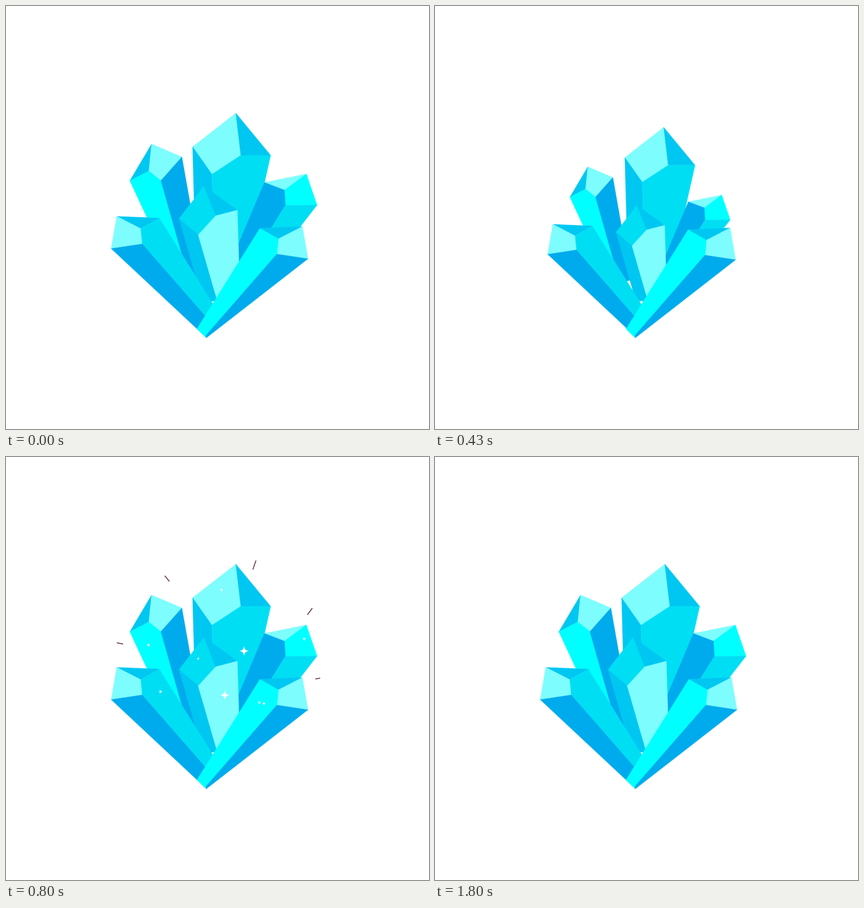
Animation of 748 by 748 pixels, one loop 2430 ms. Source, as an HTML page with a canvas:

```html
<!DOCTYPE html>
<html lang="en">
<head>
<meta charset="utf-8">
<title>Crystals</title>
<style>
  html, body { margin: 0; width: 100%; height: 100%; overflow: hidden; background: #fff; }
  canvas { display: block; width: 748px; height: 748px; }
</style>
</head>
<body>
<canvas id="stage" width="748" height="748"></canvas>
<script>
const ctx = document.getElementById('stage').getContext('2d');
const LOOP = 2430, LAST_STEP = 45;

const LIGHT = '#7dfdfe', CYAN = '#00ffff', TEAL = '#00def4', MID = '#00c7f1', BLUE = '#00abed';

// Two crystal shapes in units of their shoulder width, shoulders at (0, 0) and (1, 0).
// Vertices: 0 and 2 shoulders, 1 apex, 3 and 4 inner corners, 5 to 7 base.
const BROAD = {
  points: [[0, 0], [0.501, -0.486], [1, 0], [0.622, 0.041], [0.282, 0.32], [0.197, 1.446], [0.444, 1.482], [0.825, 1.538]],
  facets: [[1, 0, 4, 3], [1, 2, 3], [0, 4, 6, 5], [4, 3, 2, 7, 6]]
};
const SLIM = {
  points: [[0, 0], [0.613, -0.426], [1, 0], [0.373, -0.016], [0.495, 0.223], [0.015, 2.085], [0.209, 2.09], [0.45, 2.13]],
  facets: [[1, 0, 3], [1, 2, 4, 3], [0, 3, 4, 6, 7, 5], [4, 2, 7, 6]]
};
// The same slim crystal, running to a sharper foot
const SHARP = { ...SLIM, points: [...SLIM.points.slice(0, 7), [0.237, 2.132]] };

// Back to front. A right-to-left pair of shoulders mirrors the shape.
const crystals = [
  { shape: BROAD, from: [330, 249], to: [468, 264], pivot: [387, 438], depth: 0.202, colors: [LIGHT, MID, MID, TEAL] },
  { shape: SLIM, from: [219, 309], to: [311, 267], pivot: [331, 475], depth: 0.2, colors: [MID, LIGHT, CYAN, BLUE] },
  { shape: SLIM, from: [457, 312], to: [550, 352], pivot: [413, 479], depth: 0.205, colors: [LIGHT, CYAN, BLUE, TEAL] },
  { shape: BROAD, from: [306, 376], to: [409, 361], pivot: [391, 521], depth: 0.21, colors: [TEAL, MID, MID, LIGHT] },
  { shape: SLIM, from: [271, 375], to: [186, 429], pivot: [369, 568], depth: 0.183, colors: [MID, LIGHT, TEAL, BLUE] },
  { shape: SHARP, from: [449, 393], to: [534, 447], pivot: [353, 581], depth: 0.2, colors: [MID, LIGHT, CYAN, BLUE] }
];

// x, y, radius, rotation in degrees
const sparkles = [
  [421, 343, 18, 0], [387, 421, 18, 0], [381, 235, 8, 0], [252, 332.5, 8, 0], [527.3, 321.5, 8, 0],
  [340, 356.5, 6, 12], [273.3, 415, 8, 28], [448, 434, 8, 28], [456, 436, 8, 0]
];

// Inner end, outer end
const rays = [
  [436.5, 199, 450, 160], [289, 220, 269, 196], [207, 330.8, 180.5, 325.5],
  [533, 279, 554, 250.5], [547, 392.5, 567.5, 388.6]
];

const ease = (t, from, to) => {
  const u = Math.min(1, Math.max(0, (t - from) / (to - from)));
  return (1 - Math.cos(Math.PI * u)) / 2;
};

// Each crystal shrinks and regrows, the front one first.
function dipScale(t, turn, depth) {
  const start = 64 * turn;
  return 1 - depth * (ease(t, start, start + 240) - ease(t, start + 240, start + 480));
}

function drawCrystal({ shape, from, to, pivot, depth, colors }, turn, t) {
  const s = dipScale(t, turn, depth);
  const ux = to[0] - from[0], uy = to[1] - from[1], flip = Math.sign(ux);
  const placed = shape.points.map(([x, y]) => {
    const px = from[0] + x * ux - y * uy * flip;
    const py = from[1] + x * uy + y * ux * flip;
    return [pivot[0] + (px - pivot[0]) * s, pivot[1] + (py - pivot[1]) * s];
  });
  shape.facets.forEach((facet, i) => {
    ctx.beginPath();
    facet.forEach(v => ctx.lineTo(...placed[v]));
    ctx.closePath();
    ctx.fillStyle = ctx.strokeStyle = colors[i];
    ctx.lineWidth = 0.5;
    ctx.fill();
    ctx.stroke();
  });
}

function drawSparkle([x, y, radius, angle], scale) {
  const r = radius * scale, c = r * 0.08;
  ctx.save();
  ctx.translate(x, y);
  ctx.rotate(angle * Math.PI / 180);
  ctx.beginPath();
  ctx.moveTo(0, -r);
  for (let i = 0; i < 4; i++) {
    ctx.quadraticCurveTo(c, -c, r, 0);
    ctx.rotate(Math.PI / 2);
  }
  ctx.fillStyle = '#fff';
  ctx.fill();
  ctx.restore();
}

function drawRay([x0, y0, x1, y1], tail, head) {
  const at = u => [x0 + (x1 - x0) * u, y0 + (y1 - y0) * u];
  ctx.beginPath();
  ctx.moveTo(...at(tail));
  ctx.lineTo(...at(head));
  ctx.strokeStyle = '#5e2b3c';
  ctx.lineWidth = 1.5;
  ctx.stroke();
}

function draw(ms) {
  // 25 poses a second, shown on a 30 Hz clock
  const tick = Math.floor((ms + 3.4) * 0.03);
  const t = 40 * Math.min(LAST_STEP, Math.ceil(tick * 5 / 6 - 0.5));

  ctx.fillStyle = '#fff';
  ctx.fillRect(0, 0, 748, 748);
  ctx.lineJoin = 'round';
  crystals.forEach((c, i) => drawCrystal(c, crystals.length - 1 - i, t));

  const glow = 1 - ((t - 1220) / 580) ** 2;
  if (glow > 0.001) sparkles.forEach(s => drawSparkle(s, glow));

  const head = ease(t, 640, 1000), tail = ease(t, 800, 1320);
  if (head > tail) rays.forEach(r => drawRay(r, tail, head));
}

const start = performance.now();
function loop() {
  draw((performance.now() - start) % LOOP);
  requestAnimationFrame(loop);
}
loop();
</script>
</body>
</html>
```
